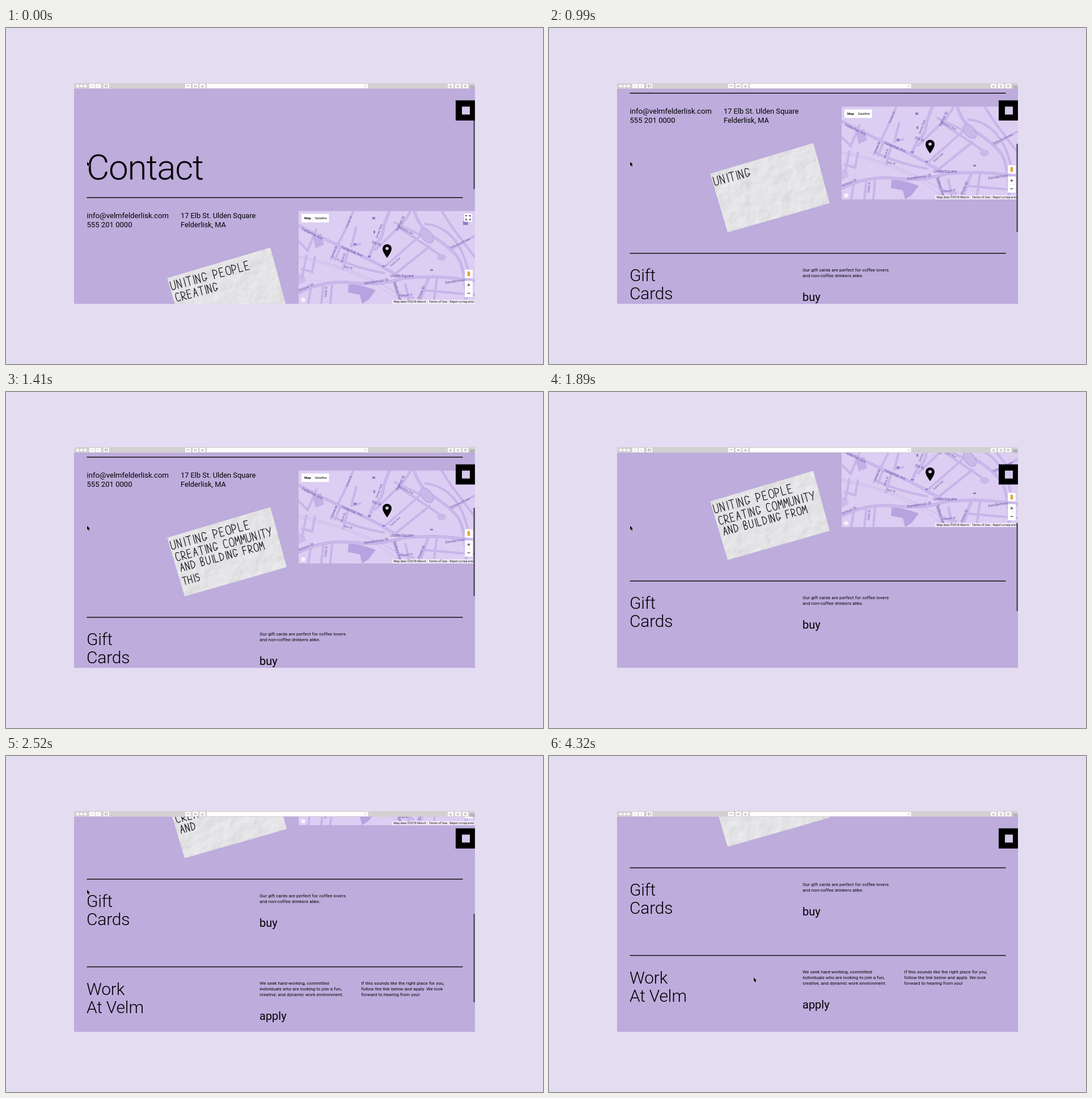
Recreate the animation shown at these times as an HTML page. Size 947 by 592 pixels, loop 4350 ms.

```html
<!DOCTYPE html>
<html lang="en">
<head>
<meta charset="utf-8">
<title>Contact page scroll</title>
<style>
html, body { margin: 0; width: 100%; height: 100%; overflow: hidden; background: #e4dcf1; }
svg { display: block; width: 947px; height: 592px; font-family: Roboto, Inter, sans-serif; }
text { white-space: pre; }
.map text { fill: #6650a0; }
.map .ui text { fill: #111; }
.light { font-weight: 300; }
.line { fill: none; }
.ink path { fill: none; stroke: #1c1b20; stroke-width: 1.25; stroke-linecap: round; stroke-linejoin: round; vector-effect: non-scaling-stroke; }
</style>
</head>
<body>
<svg viewBox="0 0 947 592">
  <defs>
    <clipPath id="view"><path d="M120 107H827V486H120Z"/></clipPath>
    <clipPath id="mapBox"><path d="M516 322.5H827V486H516Z"/></clipPath>
    <clipPath id="paper"><path d="M0 0H190L187.500 110L0.300 108Z"/></clipPath>
    <filter id="crumple" x="0" y="0" width="1" height="1">
      <feTurbulence id="noise" type="fractalNoise" baseFrequency=".035" numOctaves="3"/>
      <feDiffuseLighting surfaceScale="1.700" lighting-color="#f3f2f4">
        <feDistantLight azimuth="235" elevation="60"/>
      </feDiffuseLighting>
    </filter>
  </defs>
  <g id="bar"></g>
  <g clip-path="url(#view)">
    <path d="M120 107H827V486H120Z" fill="#bdacdc"/>
    <g id="page"></g>
    <rect id="thumb" x="824.3" width="2.7" height="156" rx="1.3" fill="#5c5368"/>
    <path d="M793 127.500H827V163H793Z"/>
    <path d="M804 138.500H818V152.500H804Z" fill="#d5c8ec"/>
    <g id="cursor">
      <path id="arrow" d="M0 0V7.600L1.700 6.200L3 9L4.300 8.400L3.100 5.700H5.300Z" stroke="#fff" stroke-width=".8" paint-order="stroke"/>
      <path id="beam" class="line" d="M-1.500 -2.500Q0 -2.500 0 -1.500V4Q0 5 -1.500 5M1.500 -2.500Q0 -2.500 0 -1.500M0 4Q0 5 1.500 5" stroke="#333" stroke-width=".8"/>
    </g>
  </g>
</svg>
<script>
const $ = id => document.getElementById(id);
const rect = (x, y, w, h, fill, r = 0) =>
  `<rect x="${x}" y="${y}" width="${w}" height="${h}" rx="${r}" fill="${fill}"/>`;
const dot = (x, y, r, fill) => `<circle cx="${x}" cy="${y}" r="${r}" fill="${fill}"/>`;
const line = (d, color, w) => `<path class="line" d="${d}" stroke="${color}" stroke-width="${w}"/>`;
const text = (x, y, size, str, gap = 0, more = "") =>
  `<text x="${x}" y="${y}" font-size="${size}" letter-spacing="${gap}" ${more}>${str}</text>`;
const lines = (x, y, step, size, gap, rows) =>
  rows.map((row, i) => text(x, y + i * step, size, row, gap)).join("");
const label = (x, y, angle, str, size = 6.5) =>
  `<g transform="translate(${x} ${y}) rotate(${angle})">${text(0, 0, size, str)}</g>`;

function toolbar() {
  const button = (x, w) => rect(x, 98.5, w, 7.5, "#fff", 1);
  const grey = d => line(d, "#999", .8);
  return `<path d="M120 107V100Q120 97 123 97H824Q827 97 827 100V107Z" fill="#d2d0d2"/>` +
    [126.5, 133.2, 139.8].map(x => dot(x, 102.3, 2.4, "#fff")).join("") +
    [147, 158].map(x => button(x, 9.5)).join("") +
    [172, 316, 329, 341.5, 779, 792, 805].map(x => button(x, 10)).join("") +
    button(354, 284.5) +
    grey("M152.500 100.700L151 102.300L152.500 103.900M162 100.700L163.500 102.300L162 103.900") +
    grey("M174.500 100.500H179.500V104H174.500ZM176 100.500V104M319 103.500V101.500H323V103.500M332 101.500H336V103.500H332ZM345 104V101.500H348V104Z") +
    grey("M782.500 101.500V104H785.500V101.500M784 100V103M795.500 101H798.500V104H795.500Z") +
    `<circle class="line" cx="810" cy="102.300" r="1.700" stroke="#999"/>` +
    `<circle class="line" cx="634" cy="102.300" r="1.500" stroke="#bbb" stroke-width=".7"/>` +
    rect(818, 101, 8.5, 6, "#b5b3b5", 1);
}

function map() {
  const main = [
    "M516 348Q560 372 610 394T672 426L700 440",
    "M516 467Q560 444 610 449T700 441Q760 434 827 446",
    "M720 322Q728 352 754 368T795 402T812 486",
    "M683 445L697 486",
    "M745 440L728 486",
    "M640 406Q646 385 655 378T666 350L676 322"
  ];
  const minor = [
    "M613 322L597 358L572 408", "M618 350L609 384L626 380", "M590 384L580 410", "M604 390L594 426",
    "M576 404Q620 424 668 432", "M530 400L522 440", "M545 402L540 430L520 424", "M560 450L556 486",
    "M538 455L533 486", "M575 452L572 486", "M516 376L532 392L548 354",
    "M664 424L730 366", "M688 432L748 384", "M650 392L700 344L714 322",
    "M690 350L724 372L768 402", "M684 342L738 368", "M768 322L786 350L827 404",
    "M782 392L827 366", "M738 345Q796 350 814 424", "M690 468L720 476", "M704 450L712 486",
    "M760 440L754 486", "M735 462L827 470"
  ];
  const street = (list, w) => ["#bca9e4", "#cabaeb"].map((color, i) =>
    list.map(d => line(d, color, w - i * 1.6)).join("")).join("");
  const blocks = [[613, 379, 5, 4], [638, 401, 5, 3], [646, 333, 5, 4], [664, 418, 4, 3],
    [806, 340, 9, 7], [648, 357, 3, 5], [748, 425, 5, 3]];
  const labels = [
    [521, 356, 25, "Felderlisk Ave"], [591, 388, 22, "Felderlisk Ave"], [645, 379, 20, "Elb St"],
    [678, 439, 0, "Ulden Square", 7], [632, 452, -9, "Dendlemoor St"], [775, 451, -9, "Dendlemoor"],
    [517, 464, -22, "lemoor St"], [683, 447, 72, "Taxbury Ave"], [729, 478, -66, "lmore St"],
    [691, 358, -64, "Golmet St"], [602, 352, -67, "Curven St", 5], [655, 371, -70, "Dolsey Park", 5],
    [691, 351, 27, "Calmeric Ave", 5], [784, 389, -25, "Pellmore Hill Ave", 5],
    [679, 421, -42, "Tolvin Ave", 5], [596, 422, 12, "Nim St", 5], [576, 405, -68, "Curven St", 5],
    [593, 414, -70, "Hosk St", 5], [565, 474, -85, "Dobly St", 5], [696, 474, -8, "Ormett St", 5]
  ];
  const controls = rect(521, 327.5, 48.5, 15, "#fff", 1) + line("M541 328V342", "#e4e4e4", .6) +
    text(526, 337.2, 6, "Map", 0, 'font-weight="700"') + text(544.5, 337.2, 6, "Satellite", -.05) +
    rect(808, 327, 14, 14.5, "#fff", 1) +
    line("M811 332V330.500H813.500M816.500 330.500H819V332.500M819 335.500V338H816.500M813.500 338H811V335.500", "#444", 1.3) +
    rect(809, 426, 14, 14.5, "#fff", 1) + rect(813.7, 428.7, 4.6, 9, "#e5a43c", 2) +
    rect(809, 445.5, 14, 28.5, "#fff", 1) + line("M811 459.800H821", "#ddd", .6) +
    line("M813.500 452.800H818.500M816 450.300V455.300M813.500 467.300H818.500", "#444", 1.2) +
    dot(524, 479, 3.8, "#f6f2fc") +
    rect(681, 478.8, 146, 7.2, "#f1ebf9") +
    text(683.5, 484.3, 5.4, "Map data ©2018 Morvit") + text(746, 484.3, 5.4, "Terms of Use") +
    text(782.5, 484.3, 5.2, "Report a map error") + line("M742.500 480V485M779.500 480V485", "#aaa", .5);
  return `<g class="map" clip-path="url(#mapBox)">` + rect(516, 322, 311, 164, "#dccdf2") +
    `<path d="M604 452Q620 450 652 462L640 478L628 486L624 470L603 466Z" fill="#b7a3e0"/>
     <path d="M541 368L556 362L561 382L546 388Z" fill="#c3b1e6"/>
     <path d="M516 433Q528 432 528 446L516 452Z" fill="#cdbced"/>` +
    line("M516 402Q560 410 610 428T720 486", "#c3b4e6", 1) + line("M516 406Q560 413 608 431T700 486", "#c3b4e6", .7) +
    street(minor, 3.6) + street(main, 5) +
    `<ellipse cx="742" cy="366" rx="15" ry="9" transform="rotate(50 742 366)" fill="#c8b9e9" stroke="#b09ddb"/>
     <ellipse cx="768" cy="404" rx="8" ry="6" fill="#c8b9e9"/>` +
    blocks.map(b => rect(...b, "#927dc9")).join("") + labels.map(l => label(...l)).join("") +
    `<path d="M672 405Q664 394 664 389A8 8 0 0 1 680 389Q680 394 672 405Z"/>` + dot(672, 388.5, 2.8, "#dccdf2") +
    `<g class="ui">${controls}</g></g>`;
}

// Hand lettering: strokes in an 8 by 10 box
const glyphs = {
  A: "M0 10L4 0L7 10M1 6H6", B: "M0 0V10Q7 10 6 7T0 5Q6 4 5 1T0 0", C: "M7 1Q0-2 0 5T7 9",
  D: "M0 0V10Q7 9 7 5T0 0", E: "M6 0H0V10H6M0 5H5", F: "M6 0H0V10M0 5H5", G: "M7 2Q0-3 0 5T7 7H4",
  H: "M0 0V10M7 0V10M0 5H7", I: "M2 0V10", L: "M0 0V10H6", M: "M0 10L1 0L4 6L7 0L8 10",
  N: "M0 10V0L6 10V0", O: "M4 0Q0 0 0 5T4 10T8 5T4 0", P: "M0 10V0Q8 1 6 4T0 6",
  R: "M0 10V0Q8 1 6 4T0 6L7 10", S: "M6 1C-3-2 0 5 4 5S6 12 0 9", T: "M0 0H8M4 0V10",
  U: "M0 0V7Q0 10 3 10T7 7V0", Y: "M0 0L4 5M8 0L3 10"
};

function lettering(x, y, unit, height, str) {
  return str.split(" ").map(word => {
    const body = [...word].map(c => {
      const tag = `<path d="${glyphs[c]}" transform="translate(${x} ${y}) rotate(1.5) scale(${unit / 10.5} ${height / 10})"/>`;
      const step = c === "I" ? unit / 2 : unit;
      x += step;
      y += step * .026;
      return tag;
    }).join("");
    x += unit * .8;
    y += unit * .02;
    return `<g class="word">${body}</g>`;
  }).join("");
}

function note() {
  return `<g transform="translate(284 440.500) rotate(-16.500)">
    <g clip-path="url(#paper)"><g filter="url(#crumple)">${rect(0, 0, 190, 110, "#e9e8ea")}</g></g>
    <g class="ink">` +
    lettering(3, 7.5, 11.4, 15.5, "UNITING PEOPLE") + lettering(5.5, 30, 10.5, 15, "CREATING COMMUNITY") +
    lettering(7.5, 50.5, 9.9, 14, "AND BUILDING FROM") + lettering(5, 75, 9.6, 13.5, "THIS") + `</g></g>`;
}

$("bar").innerHTML = toolbar();
$("page").innerHTML =
  [298.7, 581, 735.4].map(y => line(`M142.500 ${y}H805.500`, "#111", 1.5)).join("") +
  `<g class="light">` + text(142, 267, 62, "Contact", -1.2) +
  lines(142, 630.3, 32, 30, -.2, ["Gift", "Cards"]) +
  lines(142, 784.8, 32, 30, -.2, ["Work", "At Velm"]) + `</g>` +
  lines(142.5, 334.5, 16, 13.1, 0, ["info@velmfelderlisk.com", "555 201 0000"]) +
  lines(308, 334.5, 16, 12.8, 0, ["17 Elb St. Ulden Square", "Felderlisk, MA"]) +
  map() + note() +
  lines(447.3, 612.7, 10.3, 8, .07, ["Our gift cards are perfect for coffee lovers", "and non-coffee drinkers alike."]) +
  lines(447.3, 766.8, 10.3, 8, .07, ["We seek hard-working, committed", "individuals who are looking to join a fun,", "creative, and dynamic work environment."]) +
  lines(626.5, 766.8, 10.3, 8, .07, ["If this sounds like the right place for you,", "follow the link below and apply. We look", "forward to hearing from you!"]) +
  text(447, 664.8, 20, "buy") + text(447, 829.2, 20, "apply");

const LOOP = 4350, WORD = 396;
const words = document.querySelectorAll(".word");
const part = (t, start, length) => Math.min(1, Math.max(0, (t - start) / length));
const easeOut = p => 1 - (1 - p) ** 3;
const smooth = p => p * p * (3 - 2 * p);
let shown = 0;

function draw(t) {
  const scroll = Math.round(184 * easeOut(part(t, 60, 900)) +
    126 * easeOut(part(t, 1740, 712)) + 74 * easeOut(part(t, 2310, 600)));
  $("page").setAttribute("transform", `translate(0 ${-scroll})`);
  $("thumb").setAttribute("y", 128 + scroll * .412);
  $("thumb").setAttribute("opacity", 1 - part(t, 2940, 180));

  const toBuy = smooth(part(t, 2850, 340)), away = smooth(part(t, 3660, 660));
  const x = 143 + 305 * toBuy - 87 * away;
  const y = 235.5 + 46.5 * toBuy + 108 * away;
  $("cursor").setAttribute("transform", `translate(${x} ${y})`);
  const typing = t >= 210 && t < 540;
  $("arrow").style.display = typing ? "none" : "";
  $("beam").style.display = typing ? "" : "none";

  // The lettering loses one word at a time, then starts full again
  const count = (34 - Math.floor(t / WORD)) % 8 + 1;
  if (count !== shown) {
    shown = count;
    words.forEach((w, i) => w.style.display = i < count ? "" : "none");
    $("noise").setAttribute("seed", count);
  }
}

const began = performance.now();
function tick() {
  draw((performance.now() - began) % LOOP);
  requestAnimationFrame(tick);
}
tick();
</script>
</body>
</html>
```
